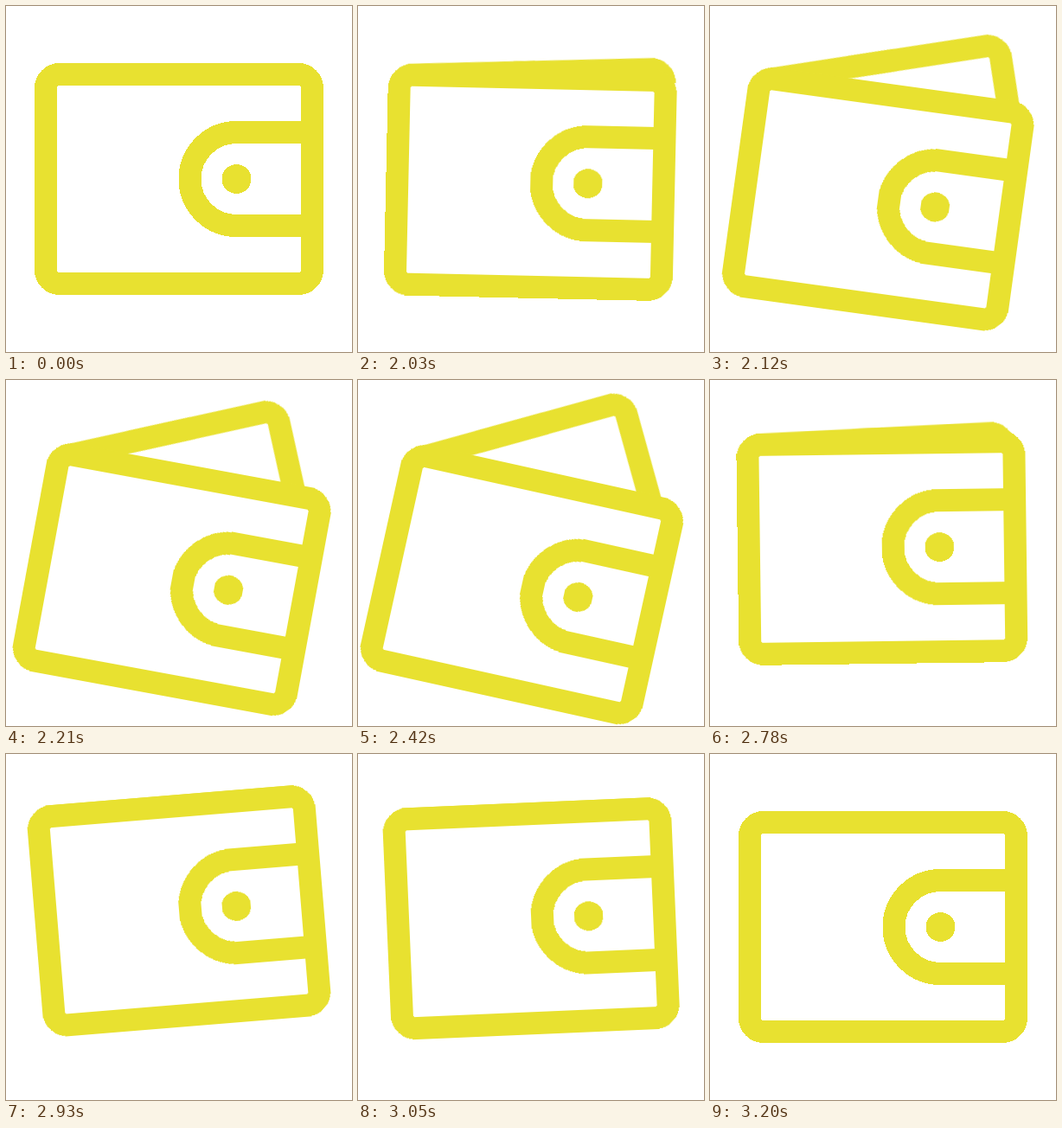
Write an HTML page that moves like this. It is 400 px wide and 400 px high and loops after 3.26 s.

```html
<!DOCTYPE html>
<html lang="en">
<head>
<meta charset="utf-8">
<title>Wallet</title>
<style>
  html, body {
    margin: 0;
    width: 100%;
    height: 100%;
    overflow: hidden;
    background: #fff;
  }
  svg {
    display: block;
    width: 100vw;
    height: 100vh;
    fill: none;
    stroke: #e8e130;
    stroke-width: 26;
    shape-rendering: crispEdges;
  }
  .dot { fill: #e8e130; stroke: none; }

  .lift, .tilt, .flap, .slide { animation: 3260ms linear infinite; }
  .lift { animation-name: lift; }
  .tilt { animation-name: tilt; transform-origin: 27.5px 170px; }
  .flap { animation-name: flap; transform-origin: 60px 79px; }
  .slide { animation-name: slide; }

  @keyframes lift {
    0%, 77.91% {
      transform: translate(0, 0);
      animation-timing-function: cubic-bezier(.33, .67, .67, 1);
    }
    89.88% {
      transform: translate(-1.8px, -4.4px);
      animation-timing-function: cubic-bezier(.36, 0, .54, 1);
    }
    98.16%, 100% { transform: translate(0, 0); }
  }

  @keyframes tilt {
    0%, 61.35% {
      transform: rotate(0deg);
      animation-timing-function: cubic-bezier(.17, .13, 0, 1);
    }
    77.91% {
      transform: rotate(12.7deg);
      animation-timing-function: cubic-bezier(.45, 0, .45, 1);
    }
    89.88% {
      transform: rotate(-4.7deg);
      animation-timing-function: cubic-bezier(.36, 0, .54, 1);
    }
    98.16%, 100% { transform: rotate(0deg); }
  }

  @keyframes flap {
    0%, 61.35% {
      transform: rotate(0deg);
      animation-timing-function: cubic-bezier(.17, .13, .05, 1);
    }
    77.91%, 78.37% {
      transform: rotate(-28.5deg);
      animation-timing-function: cubic-bezier(.45, 0, .45, 1);
    }
    87.42%, 100% { transform: rotate(0deg); }
  }

  /* the flap gets shorter as it opens */
  @keyframes slide {
    0%, 61.35% {
      transform: translateX(0);
      animation-timing-function: cubic-bezier(.35, 0, .35, 1);
    }
    70.86%, 79.45% {
      transform: translateX(-58px);
      animation-timing-function: cubic-bezier(.36, 0, .54, 1);
    }
    88.34%, 100% { transform: translateX(0); }
  }
</style>
</head>
<body>
<svg viewBox="0 0 400 400">
  <clipPath id="above"><path d="M-100-200H500V82H-100Z"/></clipPath>
  <g class="lift">
    <g class="tilt">
      <g clip-path="url(#above)">
        <g class="flap">
          <path d="M60 79H200" stroke-linecap="round"/>
          <path class="slide" d="M180 79H338a16 16 0 0 1 16 16V250"/>
        </g>
      </g>
      <rect x="46" y="79" width="308" height="242" rx="16"/>
      <path d="M354 146H266.5a54 54 0 0 0 0 108H354"/>
      <circle class="dot" cx="266.5" cy="200" r="17"/>
    </g>
  </g>
</svg>
</body>
</html>
```
